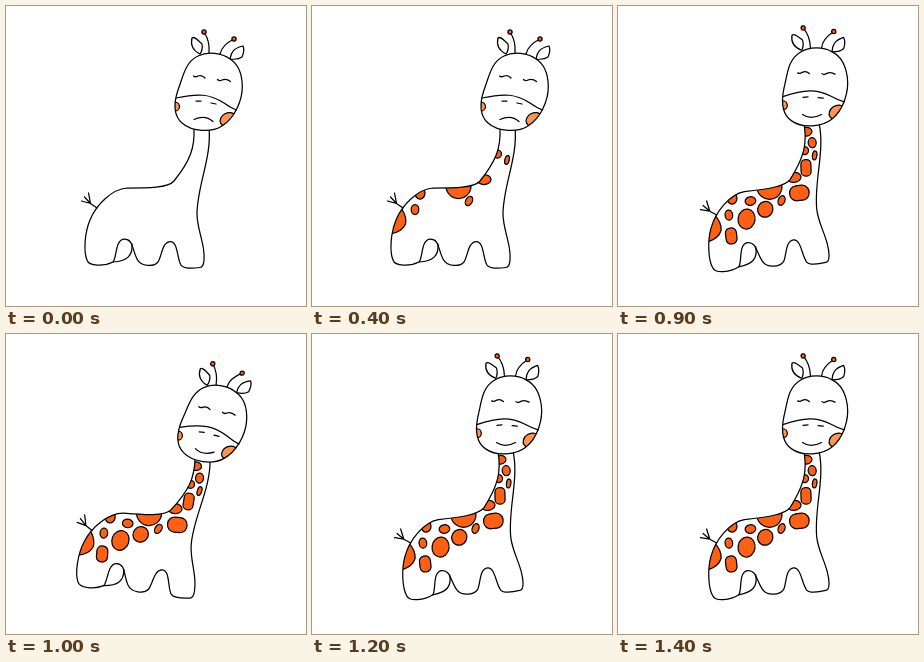
These frames come from a looping animation (300x300 px, 1500 ms). An HTML page without scripts:

```html
<!DOCTYPE html>
<html lang="en">
<head>
<meta charset="utf-8">
<title>Giraffe gets its spots</title>
<style>
  @property --tick { syntax: "<integer>"; inherits: true; initial-value: 0; }
  @property --lean { syntax: "<angle>"; inherits: false; initial-value: 0deg; }

  html, body { margin: 0; width: 100%; height: 100%; overflow: hidden; background: #fff; }
  svg { display: block; width: 100%; height: 100%; }

  .giraffe {
    fill: none; stroke: #000; stroke-width: 1.25;
    stroke-linecap: round; stroke-linejoin: round;
    transform: rotate(var(--lean)); transform-origin: 156px 137px;
    animation: count 1.5s steps(15) infinite, sway 1.5s step-end infinite;
  }
  .spots, .tips { fill: #ff6013; }
  .cheeks { fill: #ff9553; }
  .white { fill: #fff; }
  .bare { stroke: none; }

  /* Parts appear once the tick reaches --at */
  .on  { opacity: clamp(0, var(--tick) - var(--at) + 1, 1); }
  .off { opacity: clamp(0, var(--at) - var(--tick), 1); }

  @keyframes count { from { --tick: 0; } to { --tick: 15; } }
  @keyframes sway {
    0%, 73.33% { --lean: 0deg; }
    60%, 80%, 93.33% { --lean: -6.5deg; }
    66.66%, 86.66% { --lean: 4.6deg; }
  }
</style>
</head>
<body>
<svg viewBox="0 0 300 300">
  <defs>
    <path id="body" d="M188 122C189 142 184 155 168 175C162 182 142 182 121 182C106 183 90 199 84 214C78.500 227 77.500 246 81 254C83 260.500 98 260.500 107 256C111 252 109 233 118.500 233C127 233 126 243 131 253C135 261 148 261 152 256C156 250 156 235.500 164.500 235.500C172 235.500 171 253 175 259C178 263 190 262 194 261.500C199 261 198.500 250 197.500 243C196 232 191 220 191 208C191 180 206 151 203 122"/>
    <path id="head" d="M192 50C179 56 177 71 172 84C167 99 168 110 176 117C186 126 206 126.500 216 120C229 112 236.500 94 236.300 80C236 66 232 58 224 53C216 47 202 45 192 50Z"/>
    <clipPath id="inBody"><use href="#body"/></clipPath>
    <clipPath id="inHead"><use href="#head"/></clipPath>
  </defs>

  <g class="giraffe">
    <path d="M91 202L84.500 197.500L75.500 195M84.500 197.500L78.500 191M84.500 197.500L82.500 187"/>

    <g class="spots" clip-path="url(#inBody)">
      <g class="on" style="--at:1">
        <path d="M89 202Q95 210 93.500 218Q90 226 78 228L70 215Z"/>
        <ellipse cx="108" cy="187" rx="5" ry="6"/>
      </g>
      <g class="on" style="--at:2">
        <ellipse cx="103" cy="203.500" rx="3.800" ry="5"/>
        <ellipse cx="146.500" cy="180" rx="12.500" ry="12.500"/>
      </g>
      <g class="on" style="--at:3">
        <ellipse cx="157" cy="195" rx="3.300" ry="5" transform="rotate(28 157 195)"/>
        <ellipse cx="172" cy="173.500" rx="7" ry="5"/>
      </g>
      <g class="on" style="--at:4">
        <ellipse cx="185.500" cy="148" rx="4" ry="4"/>
        <ellipse cx="195" cy="154" rx="2.200" ry="4.500" transform="rotate(14 195 154)"/>
      </g>
      <g class="on" style="--at:5">
        <ellipse cx="194" cy="141" rx="4" ry="5"/>
        <ellipse cx="189.500" cy="129.500" rx="5.500" ry="4.300"/>
      </g>
      <g class="on" style="--at:6">
        <rect x="180" y="157" width="10" height="16.500" rx="4.500" transform="rotate(5 185 165)"/>
        <ellipse cx="139.800" cy="202" rx="7.500" ry="8" transform="rotate(35 140 202)"/>
      </g>
      <g class="on" style="--at:7">
        <ellipse cx="120" cy="209.500" rx="8.500" ry="10" transform="rotate(15 120 210)"/>
        <ellipse cx="126" cy="192" rx="5.300" ry="4.300"/>
      </g>
      <g class="on" style="--at:8">
        <rect x="165.800" y="182" width="19.500" height="15" rx="7"/>
        <rect x="97.500" y="216.500" width="11" height="16" rx="5"/>
      </g>
    </g>

    <use href="#body"/>
    <path d="M107 256C121 255 127 250 126 238"/>

    <path class="white" d="M194 48C188 45 184 40 186 32C188 30 192 34 196 38Q197 44 194 48ZM224 53C225 46 228 42 237 40Q239 44 236 51Q232 54 224 53Z"/>
    <path d="M203 47Q204 35 198 26M214 48Q216 39 228 33"/>
    <g class="tips">
      <circle cx="198" cy="26" r="2.100"/>
      <circle cx="228" cy="33" r="2.100"/>
    </g>

    <use href="#head" class="white bare"/>
    <g class="cheeks" clip-path="url(#inHead)">
      <ellipse cx="169" cy="100.500" rx="4.500" ry="4.500"/>
      <ellipse cx="222" cy="113.500" rx="8.300" ry="6.500" transform="rotate(-28 222 113.500)"/>
    </g>
    <use href="#head"/>
    <path d="M170 92C193 87 204 88 218 97Q225 102 230.500 104M190 95H195M205 97L210 98"/>
    <path d="M187.500 70Q189.500 71.500 192 70Q196 68.500 199 72M211.500 73.500Q213.500 75.500 216 74Q220 72 224.500 75.500"/>
    <path class="off" style="--at:8" d="M188 113.500Q199 108.500 207 115.500"/>
    <path class="on" style="--at:8" d="M187.500 112Q195 118.500 206.500 114"/>
  </g>
</svg>
</body>
</html>
```
